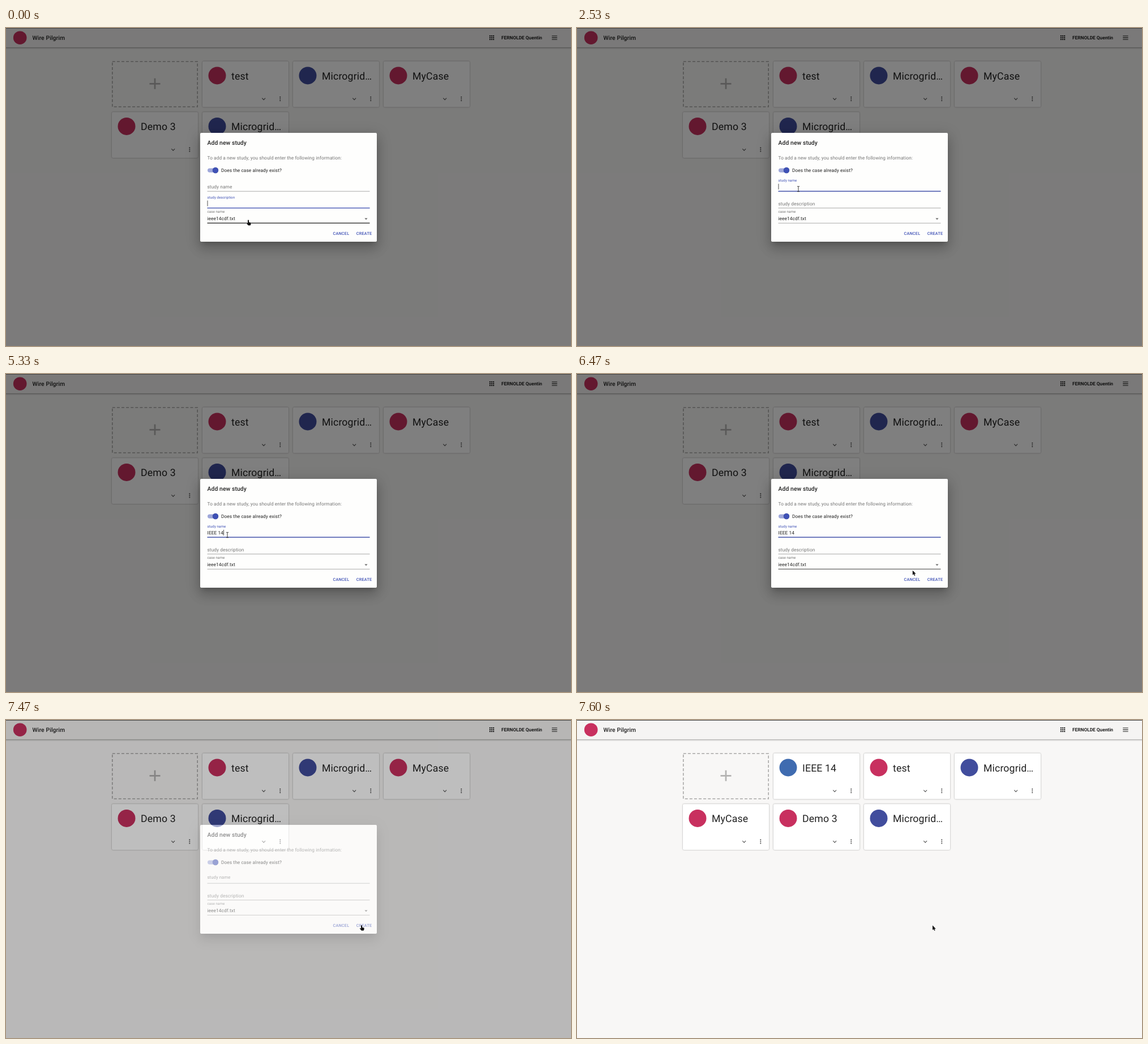
An HTML page for the animation above (8000 ms loop, 998x561 px).

```html
<!DOCTYPE html>
<html lang="en">
<head>
<meta charset="utf-8">
<title>Add new study</title>
<style>
  html, body { margin: 0; width: 100%; height: 100%; overflow: hidden; background: #f8f7f6; }
  svg, #modal { position: absolute; left: 0; top: 0; width: 998px; height: 561px; }
  #modal { background: rgba(0, 0, 0, .5); }
  #paper {
    position: absolute; left: 343px; top: 185px; width: 312px; height: 191.5px;
    border-radius: 2px; background: #fefefd;
    box-shadow: 0 5.7px 7.8px -3.6px rgba(0,0,0,.2), 0 12.5px 19.8px 1.6px rgba(0,0,0,.14),
      0 4.7px 24px 4.2px rgba(0,0,0,.12);
  }
  text { font: 8.32px Roboto, sans-serif; letter-spacing: .0094em; fill: rgba(0,0,0,.87);
    text-rendering: geometricPrecision; white-space: pre; }
  .heading { font-size: 10.4px; font-weight: 500; letter-spacing: .0075em; }
  .study { font-size: 17.7px; letter-spacing: .0074em; }
  .user { font-weight: 700; letter-spacing: 0; }
  .button { font-size: 7.28px; font-weight: 500; letter-spacing: .0286em; }
  .button, .blue { fill: #3f51b5; }
  .muted { fill: rgba(0,0,0,.54); }
  .small { font-size: 6.24px; }
  .card { fill: #fff; filter: drop-shadow(0 .7px .8px rgba(0,0,0,.36)); }
  .bar { fill: #f5f4f3; filter: drop-shadow(0 1px 1.6px rgba(0,0,0,.4)); }
  .line { fill: rgba(0,0,0,.42); }
</style>
</head>
<body>
<svg id="page">
  <rect class="bar" x="-10" y="-10" width="1018" height="44"/>
  <circle cx="24.7" cy="17.2" r="11.8" fill="#c8305f"/>
  <text class="heading" x="46.5" y="20.8">Wire Pilgrim</text>
  <text class="user" x="875" y="20.2">FERNOLDE Quentin</text>
  <g id="apps"></g>
  <path d="M964.2 14h9.4M964.2 17.1h9.4M964.2 20.2h9.4" stroke="#222" stroke-width="1.1"/>
  <rect x="187.8" y="59.3" width="150.4" height="79.7" fill="none" stroke="#a9a8a7"
    stroke-width="1.6" stroke-dasharray="5 3.1"/>
  <path d="M253.5 98.3h19M263 88.8v19" stroke="#b3b2b1" stroke-width="2.7"/>
  <g id="cards"></g>
</svg>

<div id="modal">
  <div id="paper"></div>
  <svg>
    <text class="heading" x="355.5" y="205.5">Add new study</text>
    <text class="muted" x="355.5" y="231.7">To add a new study, you should enter the following information:</text>
    <rect x="356" y="247.4" width="17.7" height="7.3" rx="3.65" fill="#9fa8da"/>
    <circle cx="370" cy="251" r="5.2" fill="#3f51b5" style="filter:drop-shadow(0 .5px .6px rgba(0,0,0,.4))"/>
    <text x="380" y="254">Does the case already exist?</text>
    <g id="name"></g>
    <g id="description"></g>
    <text id="value" x="355.6" y="282.8"></text>
    <rect id="caret" width=".8" height="10" fill="#222"/>
    <text class="muted small" x="355.5" y="326.2">case name</text>
    <text x="355.5" y="339.3">ieee14cdf.txt</text>
    <path d="M633.4 335.6h5.2l-2.6 2.6z" fill="#666"/>
    <rect id="caseLine" x="355.5" y="344" width="287"/>
    <text class="button" x="577.5" y="365.2">CANCEL</text>
    <text class="button" x="618.8" y="365.2">CREATE</text>
  </svg>
</div>

<svg>
  <rect width="998" height="1" fill="#444"/>
  <path id="pointer" stroke-linejoin="round"/>
</svg>

<script>
const LOOP = 8000, FPS = 15;
const $ = id => document.getElementById(id);
const clamp = v => Math.max(0, Math.min(1, v));
const mix = (a, b, k) => a + (b - a) * k;
const ease = (t, from, to) => { const u = clamp((t - from) / (to - from)); return u * u * (3 - 2 * u); };
const set = (el, attrs) => { for (const key in attrs) el.setAttribute(key, attrs[key]); };

const CUBES = '#c8305f', ORBIT = '#414d9d', BADGE = '#3f6bb0';
const studies = [['test', CUBES], ['Microgrid…', ORBIT], ['MyCase', CUBES], ['Demo 3', CUBES], ['Microgrid…', ORBIT]];
const created = ['IEEE 14', BADGE];

const POINTERS = {
  arrow: 'M0 0v8.3l1.9-1.7 1.3 2.9 1.4-.6-1.3-2.8h2.6z',
  hand: 'M-1 .6a1 1 0 0 1 2 0v2.8l3.6 1.1v2.6l-1 2.2h-3.8l-3-3.8 1-.9 1.2 1z',
  beam: 'M-2-4.6h1.5l.5.4.5-.4h1.5M0-4.2v8.4M-2 4.6h1.5l.5-.4.5.4h1.5'
};

const KEYSTROKES = [[3270, 'I'], [3470, 'E'], [3600, 'E'], [3790, 'E'], [4530, ' '], [4730, '1'], [5000, '4']];
const CLICK_NAME = 2130, PRESS_CREATE = 7130, CLEAR = 7333, CLOSE = 7378, CLOSED = 7573, REFRESH = 7590;

for (let i = 0; i < 9; i++)
  $('apps').innerHTML += `<rect x="${853.9 + i % 3 * 3.1}" y="${12.9 + Math.floor(i / 3) * 3.1}" width="2.1" height="2.1" fill="#222"/>`;

function card([title, color], index) {
  const slot = index + 1;
  return `<g transform="translate(${187 + slot % 4 * 160} ${58.7 + Math.floor(slot / 4) * 89.5})">
    <rect class="card" width="152" height="80.8" rx="2"/>
    <circle cx="26" cy="25.2" r="15.5" fill="${color}"/>
    <text class="study" x="51" y="32">${title}</text>
    <path d="M105.3 65l2.9 2.9 2.9-2.9" fill="none" stroke="#555" stroke-width="1.1"/>
    ${[63.2, 66.3, 69.4].map(y => `<circle cx="137.3" cy="${y}" r="1.04" fill="#555"/>`).join('')}
  </g>`;
}

let shownCount = 0;
function showCards(list) {
  if (list.length === shownCount) return;
  shownCount = list.length;
  $('cards').innerHTML = list.map(card).join('');
}

function makeField(id, label, lineY) {
  $(id).innerHTML = `<text x="355.5">${label}</text>
    <rect class="line" x="355.5" y="${lineY - .3}" width="287" height=".8"/>
    <rect class="blue" y="${lineY - .7}" height="1.3"/>`;
  const [text, , accent] = $(id).children;
  return (focus, lift) => {
    text.style.fontSize = mix(8.32, 6.24, lift) + 'px';
    set(text, { y: lineY - mix(4.8, 17, lift), class: focus > .5 ? 'blue' : 'muted' });
    set(accent, { x: 499 - 143.5 * focus, width: 287 * focus });
  };
}
const drawName = makeField('name', 'study name', 288);
const drawDescription = makeField('description', 'study description', 317.6);

function pointerAt(t) {
  const up = ease(t, 1200, 2090), across = ease(t, 5740, 6700);
  if (across > 0) return [mix(391, 628, across), mix(284, 362.3, across ** 1.4)];
  return [mix(428, 391, up ** .27), mix(339, 284, up ** .67)];
}

function pointerKind(x, y, open) {
  const within = (top, bottom) => y > top && y < bottom;
  if (!open) return 'arrow';
  if (within(323, 345) || (within(354, 372) && x > 612)) return 'hand';
  return within(302, 318) || within(274, 289) ? 'beam' : 'arrow';
}

function draw(t) {
  const open = t < REFRESH;
  showCards(open ? studies : [created, ...studies]);
  $('modal').style.opacity = 1 - ease(t, CLOSE, CLOSED) ** .85;

  const entered = ease(t, CLICK_NAME, CLICK_NAME + 200);
  drawName(entered - ease(t, PRESS_CREATE, PRESS_CREATE + 200), entered - ease(t, CLEAR, CLEAR + 200));
  drawDescription(1 - entered, 1 - entered);

  $('value').textContent = t < CLEAR - 5 ? KEYSTROKES.filter(k => t >= k[0]).map(k => k[1]).join('') : '';
  const inName = t >= CLICK_NAME;
  set($('caret'), {
    x: 355.6 + (inName ? $('value').getComputedTextLength() : 0),
    y: inName ? 274.8 : 304.4,
    opacity: t < 1600 || (t > 2190 && t < 5860) ? 1 : 0
  });

  const [x, y] = pointerAt(t);
  const hover = clamp(Math.min((349 - y) / 4, (y - 318) / 4));
  set($('caseLine'), { height: mix(.8, 1.3, hover), y: mix(343.8, 343.5, hover), fill: `rgba(0,0,0,${mix(.42, .87, hover)})` });

  const kind = pointerKind(x, y, open), beam = kind === 'beam';
  set($('pointer'), {
    d: POINTERS[kind], transform: `translate(${x} ${y})`,
    fill: beam ? 'none' : '#111', stroke: beam ? '#222' : '#fff',
    'stroke-width': beam ? .9 : .7, 'paint-order': 'stroke'
  });
}

const start = performance.now();
function tick() {
  const t = (performance.now() - start) % LOOP;
  draw(Math.floor((t + 5) * FPS / 1000) * 1000 / FPS % LOOP);
  requestAnimationFrame(tick);
}
tick();
</script>
</body>
</html>
```
